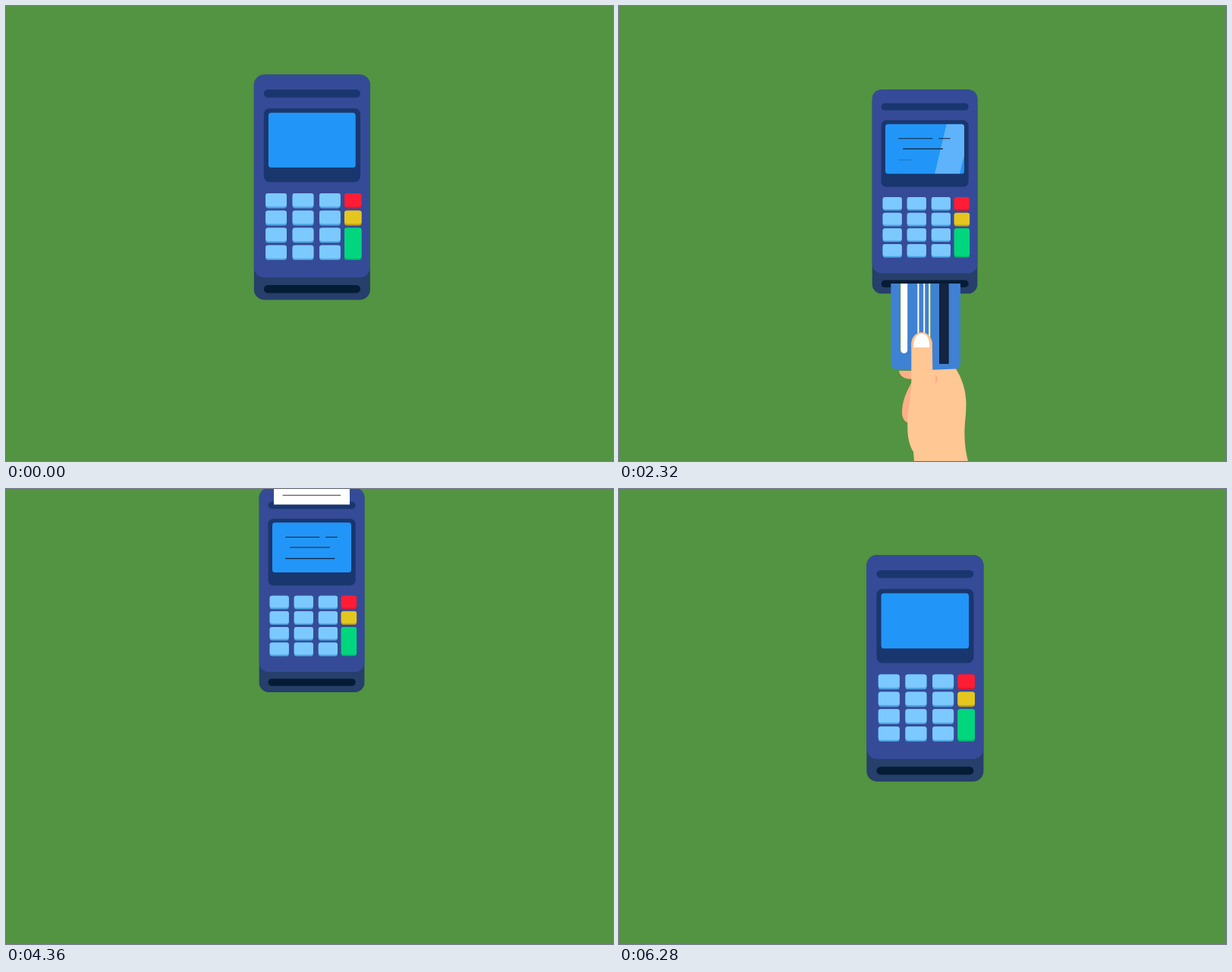
These frames come from a looping animation (800x600 px, 6320 ms). An HTML page with a canvas:

```html
<!DOCTYPE html>
<html lang="en">
<head>
<meta charset="utf-8">
<title>Card payment</title>
<style>
  html, body { margin: 0; width: 100%; height: 100%; overflow: hidden; background: #529441; }
  canvas { display: block; }
</style>
</head>
<body>
<canvas id="stage" width="800" height="600"></canvas>
<script>
const LOOP = 6320, BLANK = 4900, STEP = 40;
const ctx = document.getElementById('stage').getContext('2d');

// Smooth progress from 0 to 1
const linear = (t, start, span) => Math.min(1, Math.max(0, (t - start) / span));
const ease = (t, start, span) => {
  const s = linear(t, start, span);
  return s * s * (3 - 2 * s);
};

function box(color, x, y, w, h, r = 0) {
  ctx.fillStyle = color;
  ctx.beginPath();
  ctx.roundRect(x, y, w, h, r);
  ctx.fill();
}

function shape(color, path) {
  ctx.fillStyle = color;
  ctx.fill(new Path2D(path));
}

function line(color, x1, x2, y, width = 1.1) {
  ctx.strokeStyle = color;
  ctx.lineWidth = width;
  ctx.beginPath();
  ctx.moveTo(x1, y);
  ctx.lineTo(x2, y);
  ctx.stroke();
}

function clipped(x, y, w, h, r, draw) {
  ctx.save();
  ctx.beginPath();
  ctx.roundRect(x, y, w, h, r);
  ctx.clip();
  draw();
  ctx.restore();
}

function key(face, edge, x, y, w = 25.2, h = 17.8) {
  box(edge, x, y, w, h, 3);
  box(face, x, y, w, h - 1.9, 3);
}

function terminal() {
  box('#263f6b', 333.7, 110.2, 138.7, 269.1, 12.5);
  box('#354b97', 333.7, 110.2, 138.7, 242.3, 12.5);
  box('#1a366e', 345.5, 128.2, 115.2, 9.4, 4.7);
  box('#1a366e', 345.5, 150.6, 115.2, 88, 7);
  box('#2196f8', 351, 155.7, 104, 65.6, 3.5);
  for (let row = 0; row < 4; row++)
    for (let col = 0; col < 3; col++)
      key('#7cc9ff', '#4fa5e2', 347.6 + col * 32.1, 252 + row * 20.65);
  key('#ff1d36', '#e2182f', 441.7, 252, 20.4);
  key('#e4c61f', '#c2a018', 441.7, 272.65, 20.4);
  key('#00d67d', '#00b56a', 441.7, 293.3, 20.4, 38.4);
  box('#051c35', 345.5, 361.6, 115.2, 9.4, 4.7);
}

// x1, x2, y, start, span
const messages = [
  [368.3, 413.3, 174.8, 1240, 320],
  [421.2, 436.7, 174.8, 1560, 200],
  [374.3, 427, 188.4, 1760, 400],
  [368.3, 433.3, 203, 2160, 480]
];

function screen(t) {
  clipped(351, 155.7, 104, 65.6, 3.5, () => {
    const x = 416 + (t - 2320) * 0.122;
    shape('rgba(255,255,255,.28)', `M${x} 221.5 L${x + 15.7} 155.5 h33 L${x + 33} 221.5Z`);
    for (const [x1, x2, y, start, span] of messages) {
      const p = ease(t, start, span);
      if (!p) continue;
      ctx.globalAlpha = linear(t, start, span);
      line('#10233d', x1, x1 + (x2 - x1) * p, y);
      ctx.globalAlpha = 1;
    }
  });
}

function paper(t) {
  const top = 138.3 - 110 * ease(t, 2872, 915);
  clipped(340, -100, 130, 231.8, 0, () => {
    box('#fff', 353, top, 100, 140);
    for (let i = 1; i < 9; i++) line('#333', 364.5, 441, top - 0.2 + i * 15.25);
  });
}

function card(y) {
  clipped(340, 366, 130, 234, 0, () => {
    ctx.translate(0, y);
    box('#3f81d3', 358.3, 334, 91.7, 146, 9);
    box('#529441', 370.2, 346, 10, 112, 5);
    box('#fff', 371.2, 346, 9, 112, 4.5);
    box('#fff', 393, 338, 17.5, 19.7, 4);
    for (const x of [393.2, 401, 408]) {
      box('#6f9d6a', x, 363.5, 2.8, 92);
      box('#fff', x + 0.3, 363.5, 1.8, 92);
    }
    box('#14233f', 422, 342, 12.7, 130);
  });
}

function hand(y) {
  ctx.save();
  ctx.translate(0, y);
  shape('#fdb087', 'M369 481 C370 489 377 492 387 492 L390 481Z');
  shape('#fdb087', 'M387 494 C379 508 373 521 373 536 C373 544 377 549 382 550 L392 520Z');
  shape('#fec794', `M385.3 446 C385.5 425 412.5 425 412.8 446 L413.3 479.8 L444 478.5
    C452 491 457.5 507 457.5 524 C457.5 542 455 552 455.5 568 C456 582 458 592 460.5 602
    L470 900 L390 900 L389 600 L388 588 C382 578 380 567 380.2 552
    C380 536 384.5 518 385.3 499Z`);
  shape('#fdb087', 'M416 486 C421 488 421 495 416.5 498.5 C417.5 493 417.5 490 416 486Z');
  ctx.strokeStyle = '#f8b586';
  ctx.lineWidth = 1;
  ctx.stroke(new Path2D('M385.8 452 V446 C386 426 412 426 412.3 446 V452'));
  shape('#fff', 'M388.3 450.3 C388.3 439 391.5 432 398.8 432 C406 432 409.3 439 409.3 450.3Z');
  ctx.restore();
}

function draw(now) {
  // The motion runs at 25 pictures a second
  const t = Math.floor((now + 5) / STEP) * STEP % LOOP;
  const paying = t < BLANK;
  const arrival = paying ? t + LOOP : t;
  const zoom = 1.12 - 0.12 * ease(arrival, 6166, 680);
  const rise = paying ? -382 * ease(t, 4185, 490) : -351 * (1 - ease(t, 5311, 1014));

  ctx.setTransform(1, 0, 0, 1, 0, 0);
  box('#529441', 0, 0, 800, 600);
  ctx.translate(400, 300);
  ctx.scale(zoom, zoom);
  ctx.translate(-400, -300);

  ctx.save();
  ctx.translate(0, rise);
  terminal();
  if (paying) {
    screen(t);
    paper(t);
  }
  ctx.restore();

  const away = 280 * (1 - ease(t, 530, 450) + ease(t, 3850, 440));
  if (away < 279.9) {
    card(away);
    hand(away);
  }
  requestAnimationFrame(draw);
}
requestAnimationFrame(draw);
</script>
</body>
</html>
```
